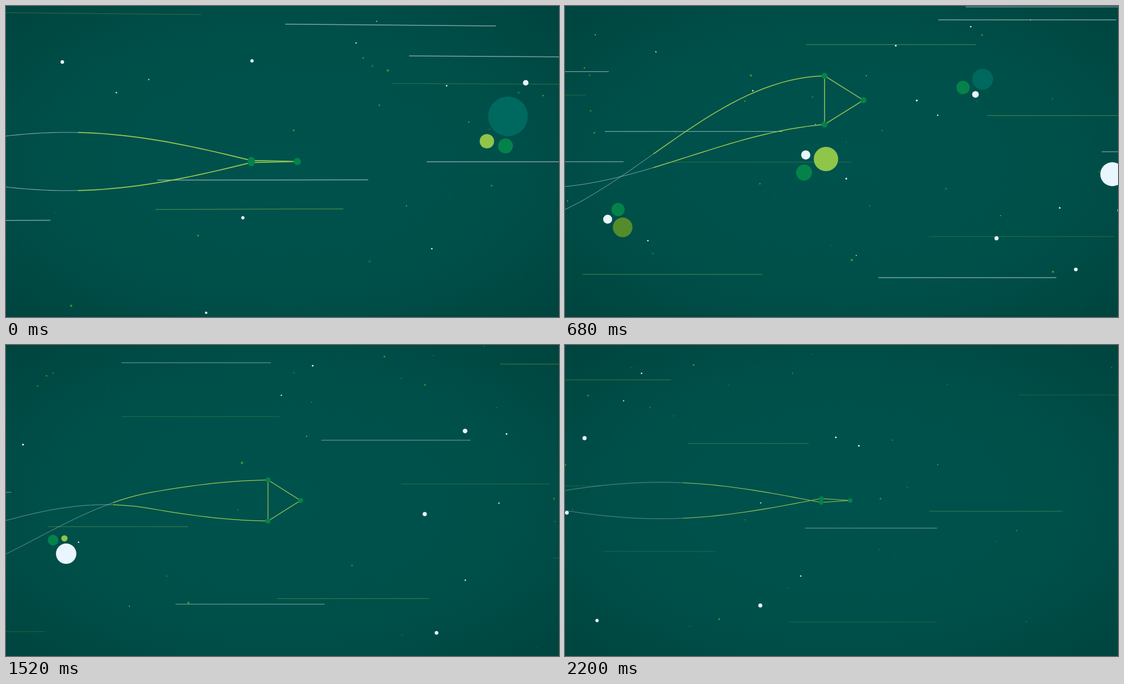
Animation of 997x561 px, one loop 2240 ms. Source, as an HTML page:

```html
<!DOCTYPE html>
<html lang="en">
<head>
<meta charset="utf-8">
<title>Flight through particles</title>
<style>
  html, body { margin: 0; width: 100%; height: 100%; overflow: hidden; background: #00504a; }
  svg { display: block; width: 100%; height: 100%; }
</style>
</head>
<body>
<svg id="stage" viewBox="0 0 997 561" preserveAspectRatio="none">
  <defs>
    <radialGradient id="glow" cx="50%" cy="50%" r="72%">
      <stop offset="0" stop-color="#00524d"/>
      <stop offset=".55" stop-color="#00504a"/>
      <stop offset="1" stop-color="#00443e"/>
    </radialGradient>
  </defs>
  <rect width="997" height="561" fill="url(#glow)"/>
  <g id="streaks"></g>
  <g id="dots"></g>
  <g id="craft" fill="none"></g>
</svg>
<script>
const LOOP = 2240, STEP = 40, CX = 498.5, CY = 280.5;
const RECEDE = 1.4e-4;            // how fast depth grows per unit of speed
const NEAR = 1.94;                // speed of everything in the nearest plane
const STREAK_LENGTH = 380;
const COLORS = { white: '#e9f6fe', lime: '#8fc549', olive: '#558c2b', green: '#04824a', teal: '#00695f' };
const STREAKS = { light: ['#e9f6fe', .52], green: ['#8fc549', .42], dark: ['#8fc549', .22] };

const $ = id => document.getElementById(id);
function add(parent, tag, attrs) {
  const el = document.createElementNS('http://www.w3.org/2000/svg', tag);
  set(el, attrs);
  return parent.appendChild(el);
}
function set(el, attrs) {
  for (const key in attrs) el.setAttribute(key, attrs[key]);
}

let seed = 20;
function random() {
  seed = (seed * 16807) % 2147483647;
  return seed / 2147483647;
}
const between = (a, b) => a + (b - a) * random();

// Distance travelled by the camera, easing up to its cruising speed.
const travel = t => t < 0 ? .78 * t : 1.06 * t - 203 * (1 - Math.exp(-t / 652));
const depth = (v, t) => 1 + RECEDE * v * t;

// The camera starts slightly turned and straightens.
const turn = t => t < 320 ? (1 - t / 320) ** 2 : 0;
function turned(x, y, t) {
  const k = turn(t), px = x - 38 * k;
  return [CX + px, CY + y * (1 - 3.6e-5 * px * k)];
}
function straightened(x, y, t) {
  const k = turn(t), px = x - CX;
  return [px + 38 * k, (y - CY) / (1 - 3.6e-5 * px * k)];
}

// The fixed point in space that is seen at x, y at time t.
function seenAt(t, x, y, v) {
  const [px, py] = straightened(x, y, t), d = depth(v, t);
  return { v, d, x: px * d + v * travel(t), y: py * d };
}
// A point anywhere along the flight; place runs from 0 at the start to 1 at the end.
function along(place, height, v) {
  const end = v * travel(LOOP) + CX * depth(v, LOOP);
  return { v, d: 1, x: -CX + (end + CX) * place, y: height * CY * depth(v, LOOP * place) };
}
function project(w, t, dx = 0) {
  const d = depth(w.v, t);
  return turned((w.x + dx - w.v * travel(t)) / d, w.y / d, t);
}

const dots = [], streaks = [];
function addDot(world, color, r, opacity = 1) {
  dots.push({ world, r: r * world.d, el: add($('dots'), 'circle', { fill: COLORS[color], opacity }) });
}
function addStreak(world, kind, len) {
  const [stroke, opacity] = STREAKS[kind];
  streaks.push({ world, len, el: add($('streaks'), 'line', { stroke, opacity }) });
}

// Faint streaks: evenly spread along the flight, heights by the golden ratio.
const FAINT = 20;
for (let i = 0; i < FAINT; i++) {
  const height = ((i * .618 + .03) % 1) * 2 - 1;
  addStreak(along((i + random()) / FAINT, height, NEAR), i % 2 ? 'green' : 'dark', between(320, 430));
}

// Bright streaks: time, left end, height.
for (const [t, x, y] of [
  [0, 273, 314], [0, -300, 388], [320, 73, 52.5], [320, 278.5, 103.7], [320, 307.5, 281],
  [320, 620.5, 221.6], [680, 673, 25], [680, 565, 490], [960, 290.5, 18.5], [960, 521, 264],
  [1280, 548, 20], [1280, 650, 476.5], [1760, 239.5, 176.5], [2200, 433, 330.3]
]) addStreak(seenAt(t, x, y, NEAR), 'light', STREAK_LENGTH);

// Dust: small dots, most of them far away.
for (let i = 0; i < 95; i++) {
  const v = between(.65, 1.4), r = .9 + 1.7 * random() ** 1.5;
  const color = ['olive', 'green', 'white'][i % 3];
  const opacity = color === 'green' ? .3 + .15 * r : 1;
  addDot(along(random(), between(-1, 1), v), color, color === 'white' ? r * .85 : r, opacity);
}

// Larger white dots: time, x, y, radius.
for (const [t, x, y, r] of [
  [0, 937, 138.5, 5], [0, 443.5, 99, 3], [0, 427, 382, 2.9], [0, 101.5, 101, 3.2],
  [680, 778, 419, 3.7], [680, 921, 475.3, 3.3], [960, 641, 364.5, 3.5], [1760, 530, 160, 4],
  [1760, 863.5, 483, 3.9], [1760, 473.5, 304, 3.6], [1760, 508, 511, 3.2]
]) addDot(seenAt(t, x, y, .6 + .25 * r), 'white', r);

// Clusters of three balls in the nearest plane.
function addCluster(t, balls) {
  for (const [color, x, y, r] of balls) addDot(seenAt(t, x, y, NEAR), color, r);
}
addCluster(0, [['teal', 905, 199, 35.7], ['lime', 867, 244, 13], ['green', 900.5, 252.5, 13.5]]);
addCluster(320, [['green', 646.5, 375, 13], ['white', 626, 394, 8.8], ['olive', 655.5, 410, 19.3]]);
addCluster(680, [['teal', 753, 132, 18.8], ['green', 717.5, 147, 12], ['white', 740, 159.5, 6]]);
addCluster(680, [['white', 434, 268.7, 8.3], ['lime', 470.5, 276, 22], ['green', 431, 300.5, 14.4]]);
addCluster(960, [['white', 539, 302, 20.3], ['green', 577.5, 304, 10.8], ['lime', 563.5, 323, 6.3]]);
addCluster(960, [['green', 907, 360.5, 10.7], ['lime', 930, 357, 6.3], ['white', 933.5, 388, 20.6]]);

// The craft: a spinning triangle that swerves, with a trail behind each rear corner.
const LENGTH = 83, SPAN = 52.5, BRIGHT = 200, FADED = 640;
const SWERVE = [[40, 0], [300, 97], [695, -132], [1015, 170], [1370, 0]];

function swerve(t) {
  for (let i = 1; i < SWERVE.length; i++) {
    const [t0, y0] = SWERVE[i - 1], [t1, y1] = SWERVE[i];
    if (t <= t1) return y0 + (y1 - y0) * (1 - Math.cos(Math.PI * Math.max(0, t - t0) / (t1 - t0))) / 2;
  }
  return 0;
}
const spin = t => SPAN * Math.sin(Math.PI * (t - 5) / 436);
const rearX = t => -33 - 2e-5 * (t - 1080) ** 2;

function craftPoint(x, y, t) {
  const d = depth(NEAR, t);
  return [CX + x / d, CY + y / d];
}
function trailPath(side, t, from, to) {
  const points = [];
  for (let lag = from; lag <= to; lag += 10) {
    const s = t - lag;
    const x = rearX(s) - NEAR * (travel(t) - travel(s));
    points.push(craftPoint(x, swerve(s) + side * spin(s), t).map(n => n.toFixed(2)));
  }
  return 'M' + points.join('L');
}

const craft = $('craft');
const trails = [1, -1].map(side => ({
  side,
  faded: add(craft, 'path', { stroke: '#e9f6fe', opacity: .55 }),
  bright: add(craft, 'path', { stroke: '#9bcd53' })
}));
const frame = add(craft, 'path', { stroke: '#9bcd53', 'stroke-linejoin': 'round' });
const nodes = [0, 1, 2].map(() => add(craft, 'circle', { fill: COLORS.green }));

function drawCraft(t) {
  const d = depth(NEAR, t), x = rearX(t), y = swerve(t), h = spin(t);
  const corners = [[x + LENGTH, y], [x, y + h], [x, y - h]].map(([px, py]) => craftPoint(px, py, t));
  for (const { side, faded, bright } of trails) {
    set(faded, { d: trailPath(side, t, BRIGHT, FADED), 'stroke-width': 1.1 / d });
    set(bright, { d: trailPath(side, t, 0, BRIGHT), 'stroke-width': 1.75 / d });
  }
  set(frame, { d: 'M' + corners.join('L') + 'Z', 'stroke-width': 1.75 / d });
  nodes.forEach((el, i) => set(el, { cx: corners[i][0], cy: corners[i][1], r: 6.5 / d }));
}

function draw(t) {
  for (const { world, r, el } of dots) {
    const [cx, cy] = project(world, t);
    set(el, { cx, cy, r: r / depth(world.v, t) });
  }
  for (const { world, len, el } of streaks) {
    const [x1, y1] = project(world, t), [x2, y2] = project(world, t, len);
    set(el, { x1, y1, x2, y2, 'stroke-width': 1.5 / depth(world.v, t) });
  }
  drawCraft(t);
}

const start = performance.now();
function tick() {
  const t = (performance.now() - start) % LOOP;
  draw(Math.floor(t / STEP) * STEP);
  requestAnimationFrame(tick);
}
tick();
</script>
</body>
</html>
```
